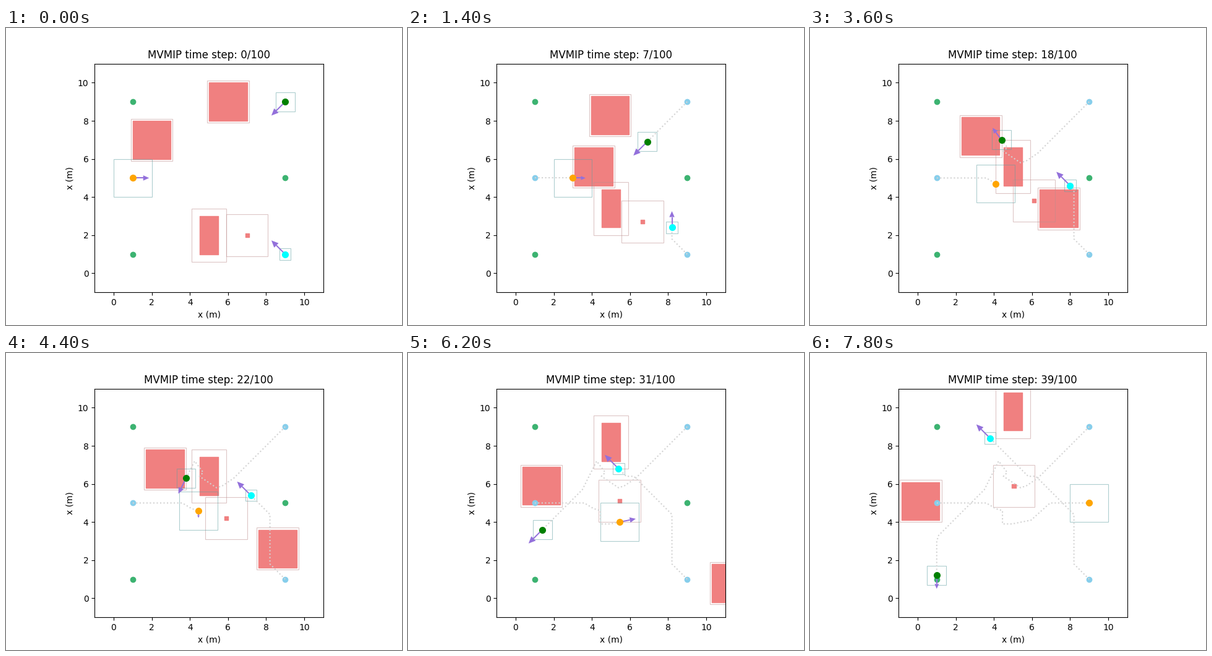
Animation of 640 by 480 pixels, one loop 8000 ms. Source, as a matplotlib script:

```python
import numpy as np
import matplotlib.pyplot as plt
from matplotlib.animation import FuncAnimation
from matplotlib.patches import Polygon, Rectangle

STEPS = 40
ARROW = 0.86  # arrow length in metres at top speed

fig, ax = plt.subplots(figsize=(6.4, 4.8), dpi=100)
ax.set(aspect="equal", xlim=(-1, 11), ylim=(-1, 11),
       xticks=range(0, 11, 2), yticks=range(0, 11, 2),
       xlabel="x (m)", ylabel="x (m)")
title = ax.set_title("", x=0.499)


def outline(width, height, color):
    return ax.add_patch(Rectangle((0, 0), width, height, fill=False, ec=color,
                                  lw=0.8, alpha=0.5, zorder=1.5))


class Obstacle:
    """A box that drifts at constant velocity inside its safety zone."""

    def __init__(self, corner, size, vel, margin):
        self.corner, self.vel = np.array(corner), np.array(vel)
        self.margin = margin
        self.body = ax.add_patch(Rectangle(corner, *size, color="lightcoral",
                                           lw=1, joinstyle="round"))
        self.zone = outline(*(np.array(size) + 2 * margin), "rosybrown")

    def move(self, step):
        pos = self.corner + step * self.vel
        self.body.set_xy(pos)
        self.zone.set_xy(pos - self.margin)


class Robot:
    """A robot that runs evenly between way points (step, x, y)."""

    def __init__(self, color, half, top, points):
        self.half, self.top = half, top
        when, x, y = np.array(points).T
        steps = np.arange(STEPS + 1)
        self.path = np.column_stack([np.interp(steps, when, x),
                                     np.interp(steps, when, y)])
        self.vel = np.diff(self.path, axis=0)
        start = self.path[0]
        self.zone = outline(2 * half, 2 * half, "cadetblue")
        ax.plot(*start, "o", color="skyblue", zorder=1.9)
        ax.plot(10 - start[0], 10 - start[1], "o", color="mediumseagreen",
                zorder=2.1)
        self.trail, = ax.plot([], [], ":", color="lightgray", lw=1.5, zorder=2)
        self.shaft, = ax.plot([], [], color="mediumpurple", lw=1.4, zorder=2.2,
                              solid_capstyle="butt")
        self.head = ax.add_patch(Polygon([(0, 0)] * 3, color="mediumpurple",
                                         lw=0, zorder=2.2))
        self.dot, = ax.plot([], [], "o", color=color, ms=7, zorder=2.3)

    def move(self, step):
        pos = self.path[step]
        self.zone.set_xy(pos - self.half)
        self.trail.set_data(*self.path[:step + 1].T)
        self.dot.set_data(*pos[:, None])
        self.point(pos, self.vel[step])

    def point(self, pos, vel):
        speed = np.hypot(*vel)
        moving = speed > 1e-6
        self.shaft.set_visible(moving)
        self.head.set_visible(moving)
        if not moving:
            return
        arrow = vel / speed * ARROW * np.sqrt(speed / self.top)
        side = 0.16 * np.array([-arrow[1], arrow[0]])
        neck = pos + 0.64 * arrow
        self.shaft.set_data(*np.array([pos, neck]).T)
        self.head.set_xy([pos + arrow, neck + side, neck - side])


items = [
    Obstacle((1, 6), (2, 2), (0.3, -0.2), 0.1),
    Obstacle((5, 8), (2, 2), (-0.15, -0.1), 0.1),
    Obstacle((4.5, 1), (1, 2), (0, 0.2), 0.4),
    Obstacle((6.9, 1.9), (0.2, 0.2), (-0.05, 0.1), 1.0),
    Robot("orange", 1.0, 0.5, [
        (0, 1, 5), (2, 2, 5), (5, 2.4, 5), (9, 3.6, 5), (13, 3.6, 5),
        (18, 4.1, 4.7), (20, 4.1, 4.7), (22, 4.45, 4.6), (29, 4.45, 3.9),
        (30, 4.95, 3.9), (32, 5.95, 4.1), (34, 6.95, 5), (38, 9, 5)]),
    Robot("green", 0.5, 0.3, [
        (0, 9, 9), (9, 6.3, 6.3), (11, 5.7, 5.9), (12, 5.4, 5.8),
        (15, 4.5, 6.4), (16, 4.7, 6.6), (19, 4.25, 7.2), (24, 3.5, 5.7),
        (32, 1.1, 3.3), (33, 1, 3), (39, 1, 1.2), (40, 1, 1)]),
    Robot("cyan", 0.3, 0.2, [
        (0, 9, 1), (4, 8.2, 1.8), (17, 8.2, 4.4), (27, 6.2, 6.4),
        (29, 5.8, 6.4), (40, 3.6, 8.6)]),
]


def draw(step):
    title.set_text(f"MVMIP time step: {step}/100")
    for item in items:
        item.move(step)
    return []


anim = FuncAnimation(fig, draw, frames=STEPS, interval=200, repeat=True,
                     init_func=lambda: draw(0))
plt.show()
```
